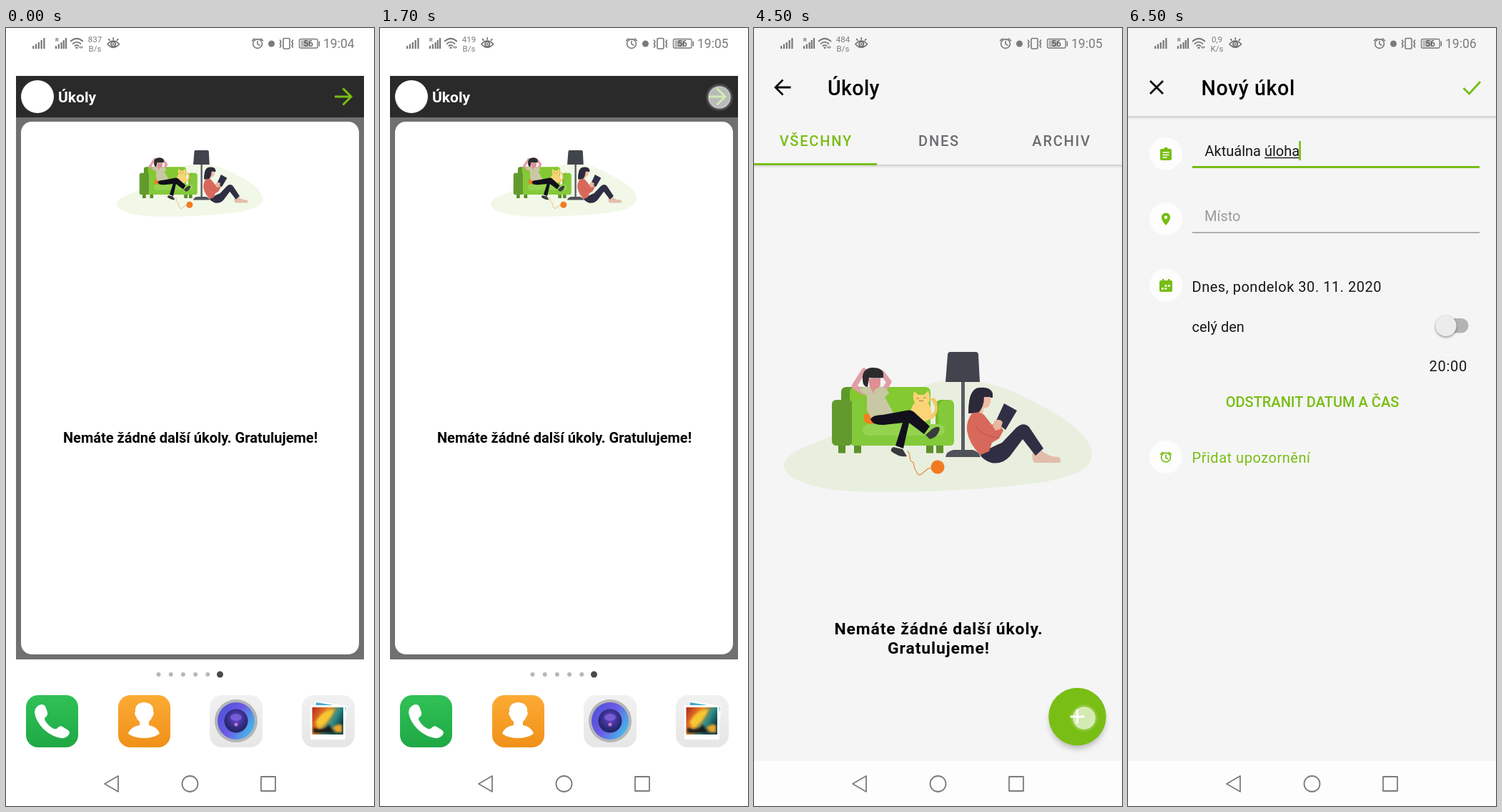
These frames come from a looping animation (515 by 1088 pixels, 8 s). An HTML page:

```html
<!DOCTYPE html>
<html lang="cs">
<head>
<meta charset="utf-8">
<title>Úkoly</title>
<style>
  html, body { margin: 0; width: 100%; height: 100%; overflow: hidden; background: #fff; }
  svg { display: block; width: 100vw; height: 100vh; }
  text { font-family: Roboto, "Noto Sans", sans-serif; font-size: 20.03px; white-space: pre; }
  .mid { text-anchor: middle; }
  .medium { font-weight: 500; }
  .bold { font-weight: 700; }
  .title { font-size: 28.6px; font-weight: 500; letter-spacing: .36px; }
  .tab { font-weight: 500; letter-spacing: 1.79px; text-anchor: middle; fill: #6c6c70; }
  .empty { font-size: 22.9px; font-weight: 700; letter-spacing: .9px; text-anchor: middle; }
  .wide { letter-spacing: .52px; }
  .rate { font-size: 11.5px; text-anchor: middle; }
  .clock { font-size: 17.5px; }
  .line { fill: none; stroke-linecap: round; stroke-linejoin: round; }
  .sharp { fill: none; }
  .green { fill: #78bd15; }
  .greenLine { stroke: #78bd15; }

  /* Hard cuts on one shared 8 s clock */
  .show { opacity: 0; animation: 8s step-end infinite; }
  .home { animation-name: home; }
  .list { animation-name: list; }
  .form { animation-name: form; }
  .idle { animation-name: idle; }
  .tapArrow { animation-name: tapArrow; }
  .listIdle { animation-name: listIdle; }
  .tapAdd { animation-name: tapAdd; }
  .minute { animation-name: minute; }
  @keyframes home { 0% { opacity: 1 } 31.25%, 100% { opacity: 0 } }
  @keyframes list { 0% { opacity: 0 } 31.25% { opacity: 1 } 81.25%, 100% { opacity: 0 } }
  @keyframes form { 0% { opacity: 0 } 81.25%, 100% { opacity: 1 } }
  @keyframes idle { 0% { opacity: 1 } 6.25%, 100% { opacity: 0 } }
  @keyframes tapArrow { 0% { opacity: 0 } 6.25% { opacity: 1 } 31.25%, 100% { opacity: 0 } }
  @keyframes listIdle { 0% { opacity: 0 } 31.25% { opacity: 1 } 56.25%, 100% { opacity: 0 } }
  @keyframes tapAdd { 0% { opacity: 0 } 56.25% { opacity: 1 } 81.25%, 100% { opacity: 0 } }
  @keyframes minute { 0% { opacity: 0 } 6.25% { opacity: 1 } 81.25%, 100% { opacity: 0 } }
</style>
</head>
<body>
<svg viewBox="0 0 515 1088" preserveAspectRatio="none">
  <defs>
    <linearGradient id="callBg" x2="0" y2="1"><stop stop-color="#30c156"/><stop offset="1" stop-color="#1fa845"/></linearGradient>
    <linearGradient id="peopleBg" x2="0" y2="1"><stop stop-color="#fcab34"/><stop offset="1" stop-color="#f09019"/></linearGradient>
    <linearGradient id="greyBg" x2="0" y2="1"><stop stop-color="#f1f1f1"/><stop offset="1" stop-color="#e6e6e6"/></linearGradient>
    <linearGradient id="lens" x2="1" y2=".6"><stop stop-color="#4750d6"/><stop offset=".55" stop-color="#6c5ae6"/><stop offset="1" stop-color="#45b4ea"/></linearGradient>
    <radialGradient id="glass" cy=".4"><stop stop-color="#6b4ccb"/><stop offset=".55" stop-color="#43349e"/><stop offset="1" stop-color="#25286c"/></radialGradient>
    <linearGradient id="photo" x2="1" y2=".5"><stop stop-color="#b3261d"/><stop offset=".45" stop-color="#ee8a26"/><stop offset=".75" stop-color="#2b8d8a"/><stop offset="1" stop-color="#123f48"/></linearGradient>
    <linearGradient id="under" x2="0" y2="1"><stop stop-color="#000" stop-opacity=".16"/><stop offset="1" stop-color="#000" stop-opacity="0"/></linearGradient>
    <radialGradient id="glow"><stop offset=".72" stop-color="#fff" stop-opacity=".6"/><stop offset="1" stop-color="#fff" stop-opacity="0"/></radialGradient>
    <filter id="soft" x="-50%" y="-50%" width="200%" height="200%"><feGaussianBlur stdDeviation="5"/></filter>
    <filter id="soft2" x="-50%" y="-50%" width="200%" height="200%"><feGaussianBlur stdDeviation="1.6"/></filter>

    <g id="touch">
      <circle r="20" fill="url(#glow)" opacity=".55"/>
      <circle r="15" fill="#fff" fill-opacity=".52" stroke="#fff" stroke-opacity=".45" stroke-width="1.6"/>
    </g>

    <g id="alarm" class="line">
      <circle r="6.4"/><path d="M0-3.5V.4L2.8 2M-7.4-4.4L-4.2-7.2M7.4-4.4L4.2-7.2"/>
    </g>

    <g id="scene">
      <path fill="#76bd17" opacity=".1" d="M42 612C44 590 85 583 112 569C170 535 225 497 270 493C330 489 372 511 418 537C450 556 473 577 473 597C471 620 440 630 390 637C320 646 240 649 170 649C100 649 42 635 42 612Z"/>
      <path fill="#5d9029" d="M118 582h10v12.5h-10zM140 582h10v12.5h-10zM241 582h10v12.5h-10zM255 582h10v12.5h-10z"/>
      <path fill="#5d9a28" d="M122 530V509Q122 502 130 502H145V560H122Z"/>
      <path fill="#84c832" d="M134 560V510Q134 502 142 502H239Q247 502 247 510V560Z"/>
      <rect x="109" y="520" width="29" height="64" rx="6" fill="#639a2e"/>
      <path fill="#84c93a" d="M137 526Q137 520 143 520Q152 521 152 530V556H254V530Q254 520 262 520H273Q280 520 280 528V578Q280 584 274 584H137Z"/>
      <path fill="#76b928" d="M254 556V530Q254 520 262 520H266Q258 523 258 532V556Z"/>
      <rect x="152" y="554" width="115" height="16" rx="8" fill="#94d350"/>

      <path fill="#f5c766" d="M247 541C258 536 252 524 247 519Q254 514 256 524C259 536 254 546 246 548Z"/>
      <path fill="#fbd477" d="M224 508L230 513H238L244 507Q248 521 244 525Q251 536 247 546Q243 551 232 550Q219 549 219 540Q219 530 225 524Q221 518 224 508Z"/>
      <path class="line" stroke="#9d6d34" d="M228 518h2M238 517h2M231 521q2 2 3 0q2 2 3 0"/>

      <path fill="#f47d20" d="M154 540L166 539L170 553Q158 555 154 549Z"/>
      <path class="line" stroke="#df9fa4" stroke-width="7" d="M152 509L140 501L154 479M181 508L189 495L179 482"/>
      <path fill="#c9c8a4" d="M147 506Q154 500 161 502L170 505L178 501Q185 503 189 511L183 516L196 540Q184 551 165 548L158 534V515Z"/>
      <path fill="#df8f96" d="M160 490H177V499Q175 505 169 504L168 512L162 502Z"/>
      <path fill="#2b2b2d" d="M152 491Q151 477 164 475Q179 474 181 483V489Q170 490 161 489L159 502Q152 502 152 491Z"/>
      <path fill="#11101c" d="M163 547Q166 541 180 541L213 535Q221 533 226 539L246 557L238 568L217 552L209 588L198 584L208 552L182 555Q166 556 163 547Z"/>
      <path fill="#393a3c" d="M195 586L208 589L214 599Q204 601 192 592Q191 588 195 586ZM240 569L249 561Q258 555 260 560Q258 572 246 575Z"/>
      <path class="line" stroke="#eb8a3d" stroke-width="1.2" d="M215 592C221 598 216 602 220 606C227 609 221 612 227 620C231 629 234 624 240 619Q246 614 250 616"/>
      <circle cx="257" cy="614" r="9.5" fill="#f27b21"/>

      <path fill="#5a5c64" d="M290 494h5v98h-5z"/>
      <path fill="#50525a" d="M268 600Q269 592 279 590H306Q315 592 317 600Z"/>
      <path fill="#42444d" d="M275 453H310Q314 453 314 457L316 495H268L271 457Q271 453 275 453Z"/>

      <path fill="#e3bdab" d="M390 592L401 590Q412 600 427 600Q431 604 428 608H393Q388 606 390 592Z"/>
      <path fill="#2f2e43" d="M316 596Q334 585 347 580L367 559Q377 550 385 558L405 588L394 598L376 575L358 599Q347 611 332 608Q320 604 316 596Z"/>
      <path fill="#2c2a3a" d="M300 539Q300 504 315 503Q331 501 334 511V517H322L319 538Z"/>
      <path fill="#efbca5" d="M320 516L331 516Q333 531 321 532L320 541L311 537Z"/>
      <path fill="#2c2a3a" d="M301 537Q299 504 317 504L322 516Q322 531 313 539Z"/>
      <path fill="#d8685c" d="M305 539Q314 535 322 541L333 555L341 550L349 563L343 574L333 580L329 592L317 597Q301 582 298 563Q297 549 305 539Z"/>
      <path class="sharp" stroke="#bd5349" d="M311 557Q318 571 342 573"/>
      <path fill="#f2e9e4" d="M346 524L350 523L367 533L353 560Z"/>
      <path fill="#302f46" d="M350 525L368 535L352 562L338 551Z"/>
      <path fill="#e9b69f" d="M336 550Q343 545 348 551L345 561L338 563L334 557Z"/>
    </g>

    <g id="nav" class="line" stroke="#7c7c7c" stroke-width="1.8">
      <path d="M157 1046V1068L138 1057Z"/><circle cx="257.5" cy="1057" r="11"/><rect x="357" y="1047" width="20" height="20"/>
    </g>
  </defs>

  <rect width="515" height="1088" fill="#fff"/>

  <g class="show home">
    <rect x="14" y="67" width="487" height="816" fill="#707070"/>
    <rect x="14" y="67" width="487" height="58" fill="#2a2a2a"/>
    <circle cx="44" cy="96" r="23" fill="#fff"/>
    <text x="73" y="104" class="bold" style="font-size:21px" fill="#fff">Úkoly</text>
    <path class="sharp greenLine" stroke-width="3" d="M460 96H483M471.5 84.5L483 96L471.5 107.5"/>
    <rect x="21" y="131" width="473" height="745" rx="15" fill="#fff"/>
    <use href="#scene" transform="translate(135.1 -43.6) scale(.4737)"/>
    <text x="258" y="580" class="bold mid">Nemáte žádné další úkoly. Gratulujeme!</text>
    <path class="line" stroke="#b8b8b8" stroke-width="6" stroke-dasharray="0 17.2" d="M213.5 904H283"/>
    <circle cx="299.5" cy="904" r="4.5" fill="#484a4e"/>

    <rect x="28" y="933" width="73" height="73" rx="17" fill="url(#callBg)"/>
    <path fill="#fff" d="M41 952Q45 946 50 946Q54 946 55.5 950L58 957Q59 961 55 964Q53 966 55 969Q60 977 67 980Q70 981 72 979Q75 975 79 977L87 982Q90 985 88 988Q84 994 77 993C58 990 42 973 40 957Z"/>
    <rect x="157" y="933" width="73" height="73" rx="17" fill="url(#peopleBg)"/>
    <path fill="#fff" d="M181 956Q180 944 193 943Q207 944 206 956Q208 958 205 963Q203 968 200 970V975Q212 977 215 987Q206 993 193 993Q180 993 171 987Q174 977 187 975V970Q183 967 182 963Q179 959 181 956Z"/>
    <rect x="285" y="933" width="74" height="73" rx="17" fill="url(#greyBg)"/>
    <circle cx="322" cy="969" r="30" fill="#b5b5b8"/>
    <circle cx="322" cy="969" r="26" fill="url(#lens)"/>
    <circle cx="322" cy="969" r="16.5" fill="url(#glass)"/>
    <ellipse cx="322" cy="964" rx="8" ry="5" fill="#8067df" opacity=".75"/>
    <circle cx="322" cy="974" r="2.5" fill="#c37bd3"/>
    <rect x="414" y="933" width="74" height="73" rx="17" fill="url(#greyBg)"/>
    <path fill="#fff" d="M433 941L478 948L472 990L428 980Z"/>
    <path fill="#42abc8" d="M434 943L476 950L471 986L431 976Z"/>
    <rect x="426" y="947" width="49" height="48" fill="#fff"/>
    <rect x="428.5" y="950" width="43.5" height="38" fill="url(#photo)"/>
    <g filter="url(#soft2)">
      <path fill="#f6c733" d="M433 971Q443 953 460 953Q452 971 439 979Z"/>
      <path fill="#1b1a1d" d="M430 978Q444 984 452 974L460 986H430Z"/>
      <path fill="#e8a72b" d="M457 978Q465 972 470 975V985H462Z"/>
    </g>
  </g>

  <g class="show list">
    <rect width="515" height="1025" fill="#f5f5f5"/>
    <rect y="1025" width="515" height="63" fill="#fdfdfd"/>
    <path class="sharp" stroke="#0d0d0d" stroke-width="2.8" d="M51.5 83H30.5M40.5 72.5L30 83L40.5 93.5"/>
    <text x="103" y="94" class="title">Úkoly</text>
    <text x="86.8" y="165" class="tab" style="fill:#78bd15">VŠECHNY</text>
    <text x="259" y="165" class="tab">DNES</text>
    <text x="430.5" y="165" class="tab">ARCHIV</text>
    <rect y="191" width="515" height="5" fill="url(#under)"/>
    <rect y="189" width="172" height="3" class="green"/>
    <use href="#scene"/>
    <text x="258.5" y="847.5" class="empty">Nemáte žádné další úkoly.</text>
    <text x="258.5" y="874.5" class="empty">Gratulujeme!</text>
    <circle cx="452.5" cy="969" r="38" opacity=".28" filter="url(#soft)"/>
    <circle cx="452.5" cy="963" r="40.3" fill="#79be15"/>
    <path class="sharp" stroke="#fff" stroke-width="2.8" d="M442.5 963H462.5M452.5 953V973"/>
  </g>

  <g class="show form">
    <rect width="515" height="1025" fill="#f5f5f5"/>
    <rect y="1025" width="515" height="63" fill="#fdfdfd"/>
    <path class="sharp" stroke="#0d0d0d" stroke-width="2.8" d="M31 74L49 92M49 74L31 92"/>
    <text x="102.5" y="94" class="title" style="letter-spacing:.6px">Nový úkol</text>
    <path class="sharp greenLine" stroke-width="2.9" d="M469.5 84L477.5 92L493 75"/>
    <rect y="123" width="515" height="5" fill="url(#under)"/>
    <g fill="#fdfdfd">
      <circle cx="53" cy="176" r="23"/><circle cx="53" cy="267" r="23"/>
      <circle cx="53" cy="360" r="23"/><circle cx="53" cy="600" r="23"/>
    </g>
    <g class="green">
      <rect x="45" y="169" width="16" height="16" rx="2"/><circle cx="53" cy="169.5" r="2.8"/>
      <path d="M53 258.5a6.2 6.2 0 0 1 6.2 6.2Q59.2 269 53 276Q46.8 269 46.8 264.7A6.2 6.2 0 0 1 53 258.5Z"/>
      <path d="M46 353H48V351H50.5V353H56V351H58.5V353H60Q62 353 62 355V367Q62 369 60 369H46Q44 369 44 367V355Q44 353 46 353Z"/>
    </g>
    <path class="sharp" stroke="#fff" stroke-width="1.6" d="M48.5 174H57.5M48.5 177.5H57.5M48.5 181H54.5"/>
    <circle cx="53" cy="264.7" r="2.2" fill="#fff"/>
    <path class="sharp" stroke="#fff" stroke-width="2.5" stroke-dasharray="2.8 1.6" d="M51.5 360.5H59M47 364.5H55"/>
    <use href="#alarm" x="53" y="600.5" class="greenLine" stroke-width="1.7"/>

    <text x="107.5" y="179" fill="#171717">Aktuálna úloha</text>
    <path class="sharp" stroke="#222" stroke-width="1.3" d="M191 181.5H240"/>
    <rect x="239.3" y="158" width="2.6" height="27" class="green"/>
    <rect x="90" y="193" width="402" height="3" class="green"/>
    <text x="107" y="270" fill="#9b9b9b">Místo</text>
    <rect x="90" y="285.5" width="402" height="1.3" fill="#8c8c8c"/>
    <text x="89.5" y="368.5" class="wide" fill="#171717">Dnes, pondelok 30. 11. 2020</text>
    <text x="89.5" y="424.5" fill="#171717">celý den</text>
    <rect x="438" y="406" width="38.5" height="20.5" rx="10.2" fill="#b4b4b4"/>
    <circle cx="445" cy="418" r="15" opacity=".35" filter="url(#soft2)"/>
    <circle cx="445" cy="416.5" r="14.6" fill="#ececec"/>
    <text x="421.5" y="480" style="letter-spacing:.7px" fill="#171717">20:00</text>
    <text x="258" y="530" class="mid medium green">ODSTRANIT DATUM A ČAS</text>
    <text x="89.5" y="608" class="wide green">Přidat upozornění</text>
  </g>

  <use href="#nav"/>

  <g fill="#7b7b7b">
    <path class="sharp" stroke="#777" stroke-width="2.2" d="M38.2 29v-4M42 29v-6.5M45.8 29v-9M49.6 29v-12M53.4 29v-15M70 29v-4M73.8 29v-6.5M77.6 29v-9M80.8 29v-12M84 29v-15"/>
    <text x="69" y="18.5" class="bold" style="font-size:7.5px">R</text>
    <path class="line" stroke="#777" stroke-width="1.7" d="M90.5 18.5Q99 11 107.5 18.5M93.5 22Q99 17.3 104.5 22M96.3 25Q99 22.8 101.5 25"/>
    <path d="M97 27.5L99 29.5L101 27.5L99 26ZM102 27L104.5 25V29ZM108 27L105.5 25V29Z"/>
    <g class="line" stroke="#666" stroke-width="1.6">
      <path d="M142 22.5Q150 13.5 158.5 22.5Q150 32 142 22.5ZM150.2 16V13.8M145 17.3L143.8 15.5M155.5 17.3L156.7 15.5"/>
      <circle cx="150.2" cy="22.5" r="3.2"/>
    </g>
    <circle cx="150.2" cy="22.5" r="1.4"/>
    <use href="#alarm" x="352" y="22" stroke="#777" stroke-width="1.6"/>
    <circle cx="371.5" cy="22" r="4.5"/>
    <g class="line" stroke="#777" stroke-width="1.6">
      <rect x="388" y="14.5" width="9" height="14.5" rx="1.5"/>
      <path d="M383.5 17L385 19.5L383.5 22L385 24.5L383.5 27M401.5 17L400 19.5L401.5 22L400 24.5L401.5 27"/>
      <rect x="410.5" y="15.5" width="25.5" height="12.5" rx="2" stroke-width="1.3"/>
      <path d="M438.3 19V25"/>
    </g>
    <rect x="412.3" y="17.2" width="13.5" height="9.2" fill="#b9b9b9"/>
    <text x="423" y="26" class="mid medium" style="font-size:12px" fill="#555">56</text>

    <g class="show idle">
      <text x="124.5" y="19.5" class="rate">837</text><text x="124.5" y="32.5" class="rate">B/s</text>
      <text x="444" y="28" class="clock">19:04</text>
    </g>
    <g class="show tapArrow"><text x="124.5" y="19.5" class="rate">419</text><text x="124.5" y="32.5" class="rate">B/s</text></g>
    <g class="show listIdle"><text x="124.5" y="19.5" class="rate">0,9</text><text x="124.5" y="32.5" class="rate">K/s</text></g>
    <g class="show tapAdd"><text x="124.5" y="19.5" class="rate">484</text><text x="124.5" y="32.5" class="rate">B/s</text></g>
    <text x="444" y="28" class="clock show minute">19:05</text>
    <g class="show form">
      <text x="124.5" y="19.5" class="rate">0,9</text><text x="124.5" y="32.5" class="rate">K/s</text>
      <text x="444" y="28" class="clock">19:06</text>
    </g>
  </g>

  <g class="show tapArrow"><use href="#touch" x="475" y="97"/></g>
  <g class="show tapAdd"><use href="#touch" x="462" y="965"/></g>
</svg>
</body>
</html>
```
